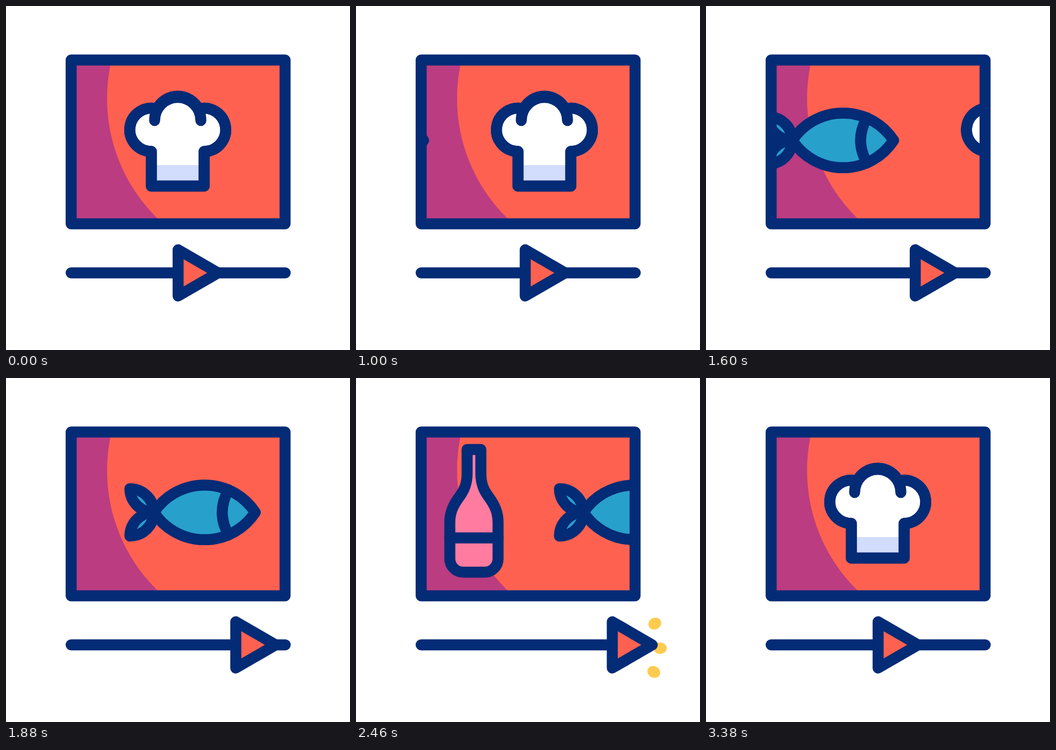
Recreate the animation shown at these times as an HTML page. Size 640 px wide and 640 px high, loop 3.54 s.

```html
<!DOCTYPE html>
<html lang="en">
<head>
<meta charset="utf-8">
<title>Cooking video</title>
<style>
  html, body { margin: 0; width: 100%; height: 100%; overflow: hidden; background: #fff; }
  svg { display: block; width: 100vw; height: 100vh; }
  .ink { stroke: #042b76; stroke-width: 20.5; stroke-linecap: round; stroke-linejoin: round; }
  .bare { fill: none; }
  .red { fill: #ff6150; }
  .blue { fill: #28a0cc; }
  .pink { fill: #ff7ba0; }
</style>
</head>
<body>
<svg viewBox="0 0 640 640">
  <defs>
    <clipPath id="screen"><rect x="121" y="100.5" width="398" height="304.5"/></clipPath>
  </defs>

  <g id="sparks" fill="#ffcb4f"></g>

  <g clip-path="url(#screen)">
    <rect x="121" y="100" width="398" height="305" fill="#bb3c80"/>
    <circle class="red" cx="500.7" cy="172" r="312.7"/>
    <rect class="red" x="490" y="100" width="30" height="305"/>
    <g id="strip">
      <g id="hat">
        <path id="crown" fill="#fff" d="M270.3 335V270.5A40.2 40.2 0 1 1 281 191.5A43 43 0 0 1 358 191.5A40.2 40.2 0 1 1 368.7 270.5V335Z"/>
        <rect x="271" y="296" width="97" height="38" fill="#d2dcfd"/>
        <use href="#crown" class="ink" style="fill-opacity:0"/>
        <path class="ink bare" d="M270.3 335V270.5A40.2 40.2 0 1 1 281 191.5M358 191.5A40.2 40.2 0 1 1 368.7 270.5V335H270.3M276.5 213A43 43 0 0 1 362.5 213"/>
      </g>
      <g id="fish" class="ink blue" transform="translate(-254)">
        <path d="M115.5 206A44.5 44.5 0 0 1 160 250A44.5 44.5 0 0 1 115.5 206Z"/>
        <path d="M115.5 294A44.5 44.5 0 0 0 160 250A44.5 44.5 0 0 0 115.5 294Z"/>
        <path d="M160.2 250A112.7 112.7 0 0 1 348.6 250A112.7 112.7 0 0 1 160.2 250Z"/>
        <path class="bare" d="M299 208Q275.5 250 299 292"/>
      </g>
      <g id="bottle" class="ink pink" transform="translate(-517)">
        <path d="M206.7 133H232.3V178C232.3 196 237 208 246 220C258 236 264.3 250 264.3 268V336A25 25 0 0 1 239.3 361.3H199.5A25 25 0 0 1 174.5 336V268C174.5 250 181 236 193 220C202 208 206.7 196 206.7 178Z"/>
        <path d="M174.5 297.5H264.3"/>
      </g>
    </g>
  </g>

  <rect class="ink bare" x="121.2" y="100.5" width="398" height="304.7"/>
  <path class="ink" d="M121.2 496.5H519.5"/>
  <path id="play" class="ink red" d="M320.2 453.5L394.5 496.5L320.2 539.5Z"/>
</svg>

<script>
const LOOP = 3540;
const STRIP_END = 517;
const PULL = -15.7;

const el = id => document.getElementById(id);
const clamp = v => Math.min(1, Math.max(0, v));
const span = (t, from, to) => clamp((t - from) / (to - from));
const smooth = u => u * u * (3 - 2 * u);

// Ease with control points (x1, 0) and (x2, 1), solved by bisection
function bezier(x, x1, x2) {
  let lo = 0, hi = 1;
  for (let i = 0; i < 24; i++) {
    const m = (lo + hi) / 2, n = 1 - m;
    if (3 * n * n * m * x1 + 3 * n * m * m * x2 + m * m * m < x) lo = m;
    else hi = m;
  }
  return smooth((lo + hi) / 2);
}

const bursts = [
  { start: 240, life: 500, x: 347, y: 496.5, near: 25, far: 115, angles: [30, 90, 150, 210, 270, 330] },
  { start: 2360, life: 480, x: 467.5, y: 500, near: 40, far: 155, angles: [-26, 1.5, 28.4] }
];

for (const b of bursts) {
  b.dots = b.angles.map(() => {
    const dot = document.createElementNS("http://www.w3.org/2000/svg", "ellipse");
    el("sparks").append(dot);
    return dot;
  });
}

function drawBurst(b, t) {
  const u = span(t, b.start, b.start + b.life);
  const reach = b.near + (b.far - b.near) * (1 - (1 - u) ** 3);
  const size = u > 0 ? 13.5 * Math.min(1, u * 8) * (1 - u) : 0;
  b.dots.forEach((dot, i) => {
    dot.setAttribute("rx", size * 1.15);
    dot.setAttribute("ry", size);
    dot.setAttribute("transform", `translate(${b.x} ${b.y}) rotate(${b.angles[i]}) translate(${reach})`);
  });
}

function draw(t) {
  const forward = STRIP_END * bezier(span(t, 824, 2360), 0.2, 0.833);
  const strip = forward * (1 - smooth(span(t, 2785, 3380)));
  const play = (PULL * smooth(span(t, 220, 824)) + forward / 3) * (1 - smooth(span(t, 2800, 3150)));
  el("strip").setAttribute("transform", `translate(${strip})`);
  el("play").setAttribute("transform", `translate(${play})`);
  bursts.forEach(b => drawBurst(b, t));
}

const begin = performance.now();
function tick() {
  draw((performance.now() - begin) % LOOP);
  requestAnimationFrame(tick);
}
tick();
</script>
</body>
</html>
```
